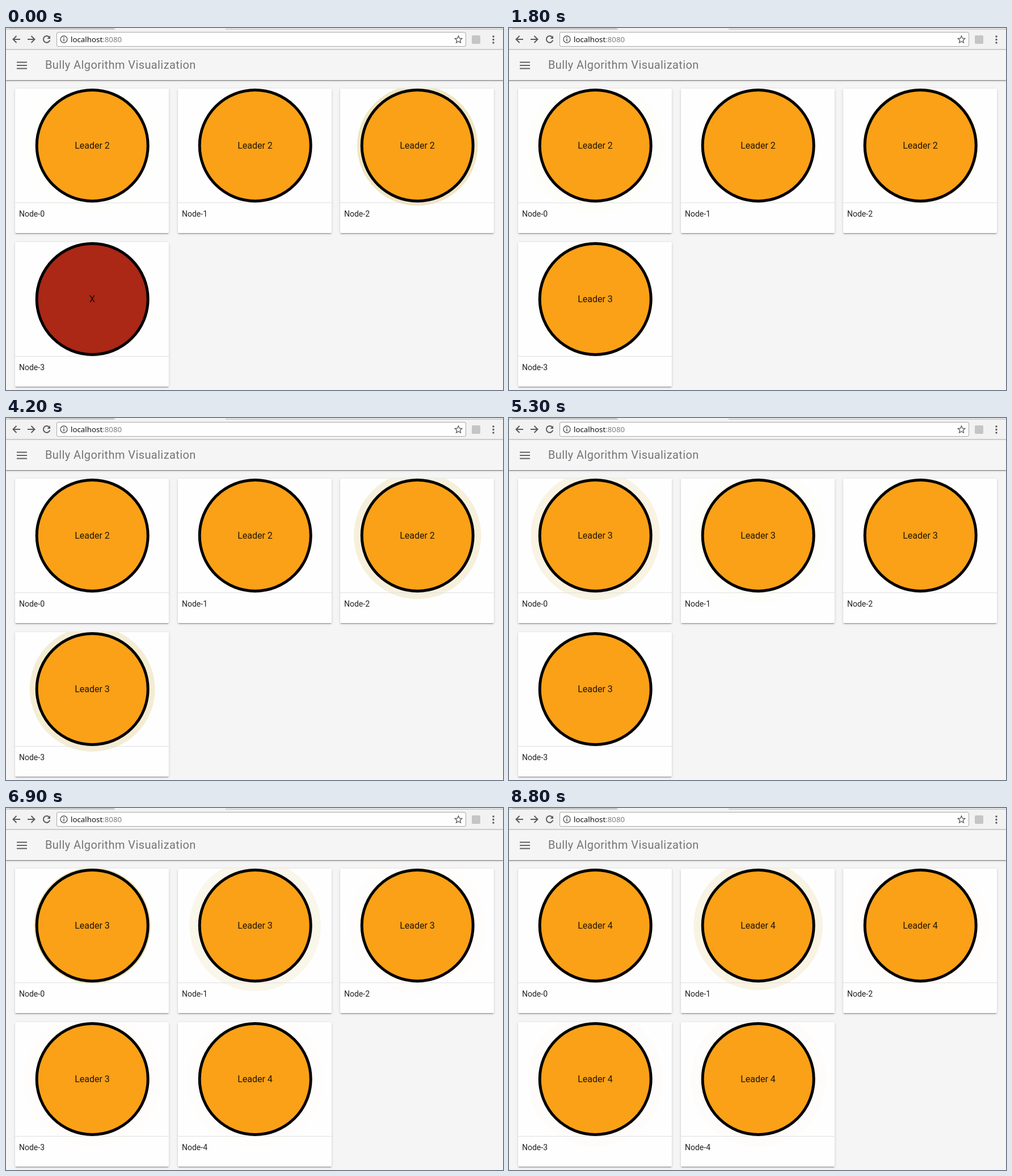
Animation of 876x639 px, one loop 8900 ms. Source, as an HTML page:

```html
<!DOCTYPE html>
<html lang="en">
<head>
<meta charset="utf-8">
<title>Bully Algorithm Visualization</title>
<style>
  html, body { margin: 0; width: 100%; height: 100%; overflow: hidden; background: #f5f5f5; }
  #stage { position: relative; width: 876px; height: 639px; overflow: hidden; background: #f5f5f5; }
  #chrome { position: absolute; left: 0; top: 0; }
  #bar {
    position: absolute; left: 0; top: 39px; width: 876px; height: 53px; background: #f5f5f5;
    box-shadow: 0 1px 1px rgba(0,0,0,.4), 0 2px 3px rgba(0,0,0,.14);
  }
  .card {
    position: absolute; width: 271px; height: 255px; background: #fefefe; border-radius: 2px; overflow: hidden;
    box-shadow: 0 2px 2px rgba(0,0,0,.14), 0 3px 1px -2px rgba(0,0,0,.2), 0 1px 5px rgba(0,0,0,.12);
  }
  svg { display: block; }
  text { font-family: Roboto, sans-serif; }
  .url { font: 13.3px "Noto Sans", "Open Sans", sans-serif; }
  .state { font-size: 16px; text-anchor: middle; fill: rgba(0,0,0,.87); }
  .name { font-size: 14px; fill: rgba(0,0,0,.87); }
  .title { font-size: 20px; letter-spacing: .4px; fill: #757575; }
</style>
</head>
<body>
<div id="stage">
  <div id="bar"></div>
  <svg id="chrome" width="876" height="94" viewBox="0 0 876 94">
    <rect width="876" height="38" fill="#f3f2f2"/>
    <path d="M6 0H190V2H6Z" fill="#d2d1d0"/>
    <path d="M0 2H192M387 2H876" stroke="#acabaa"/>
    <path d="M0 37.8H876" stroke="#b3b3b3" stroke-width="1.2"/>
    <rect x="89.5" y="7.5" width="721" height="25" rx="2.5" fill="#fefefe" stroke="#a8a8a8"/>
    <g fill="none" stroke="#5a5a5a" stroke-width="2">
      <path d="M25 20H13M18.5 14L12.5 20L18.5 26"/>
      <path d="M38 20H50M44.5 14L50.5 20L44.5 26"/>
      <path d="M76 16A5.8 5.8 0 1 0 77.3 21.5"/>
      <path d="M78 13.5V19H72.5Z" fill="#5a5a5a" stroke="none"/>
      <circle cx="102" cy="20" r="6" stroke-width="1.4"/>
      <path d="M102 19V23.5M102 16V17.7" stroke-width="1.6"/>
      <path d="M797.5 14L799.3 18.2L803.8 18.6L800.4 21.6L801.4 26L797.5 23.7L793.6 26L794.6 21.6L791.2 18.6L795.7 18.2Z" stroke-width="1.3"/>
      <path d="M19 60.5H37M19 66H37M19 71.5H37" stroke="#616161"/>
    </g>
    <rect x="821" y="13" width="15" height="15" rx="2" fill="#c5c5c5"/>
    <g fill="#5a5a5a">
      <circle cx="859" cy="15" r="1.7"/><circle cx="859" cy="20.5" r="1.7"/><circle cx="859" cy="26" r="1.7"/>
    </g>
    <text class="url" x="114" y="25" fill="#111">localhost<tspan fill="#7d7d7d">:8080</tspan></text>
    <text class="title" x="69" y="72">Bully Algorithm Visualization</text>
  </svg>
</div>
<script>
const LOOP = 8900, TICK = 100, PULSE = 2000;
const ORANGE = '#faa117', RED = '#ab2716';

// pulse: start of the ring cycle; states: [from ms, leader], null leader means down
const followers = [[0, 2], [4700, 3], [8500, 4]];
const nodes = [
  { pulse: 750, states: followers },
  { pulse: 250, states: followers },
  { pulse: 1725, states: followers },
  { pulse: 1790, states: [[0, null], [1800, 3], [8500, 4]] },
  { pulse: 5780, states: [[5800, 4]] }
];

const stage = document.getElementById('stage');

function buildCard(node, i) {
  const card = document.createElement('div');
  card.className = 'card';
  card.style.left = 16 + 286.6 * (i % 3) + 'px';
  card.style.top = 107 + 271 * Math.floor(i / 3) + 'px';
  card.innerHTML = `<svg width="272" height="255">
    <circle class="ring" cx="136.2" cy="100.5" r="100.5" fill="rgb(204,169,44)"/>
    <path d="M0 201.5H272" stroke="#e0e0e0"/>
    <circle class="disc" cx="136.2" cy="100.5" r="98" stroke="#000" stroke-width="5"/>
    <text class="state" x="136" y="105.5"></text>
    <text class="name" x="7" y="226">Node-${i}</text>
  </svg>`;
  stage.append(card);
  const find = name => card.querySelector('.' + name);
  Object.assign(node, { card, ring: find('ring'), disc: find('disc'), label: find('state') });
  node.anim = node.ring.animate([
    { r: '100.5px', fillOpacity: .4, easing: 'ease' },
    { r: '120.5px', fillOpacity: 0, offset: .7, easing: 'ease' },
    { r: '100.5px', fillOpacity: 0 }
  ], { duration: PULSE, iterations: Infinity });
  node.anim.pause();
}

function drawNode(node, t) {
  const state = node.states.filter(([from]) => from <= t).pop();
  node.card.style.display = state ? '' : 'none';
  if (!state) return;
  const leader = state[1], up = leader !== null;
  node.label.textContent = up ? 'Leader ' + leader : 'X';
  node.disc.setAttribute('fill', up ? ORANGE : RED);
  node.ring.style.visibility = up ? 'visible' : 'hidden';
  node.anim.currentTime = (t - node.pulse + 4 * PULSE) % PULSE;
}

nodes.forEach(buildCard);
const start = performance.now();

function frame() {
  const elapsed = Math.max(0, performance.now() - start) % LOOP;
  const t = Math.floor(elapsed / TICK) * TICK;
  nodes.forEach(node => drawNode(node, t));
  requestAnimationFrame(frame);
}
frame();
</script>
</body>
</html>
```
